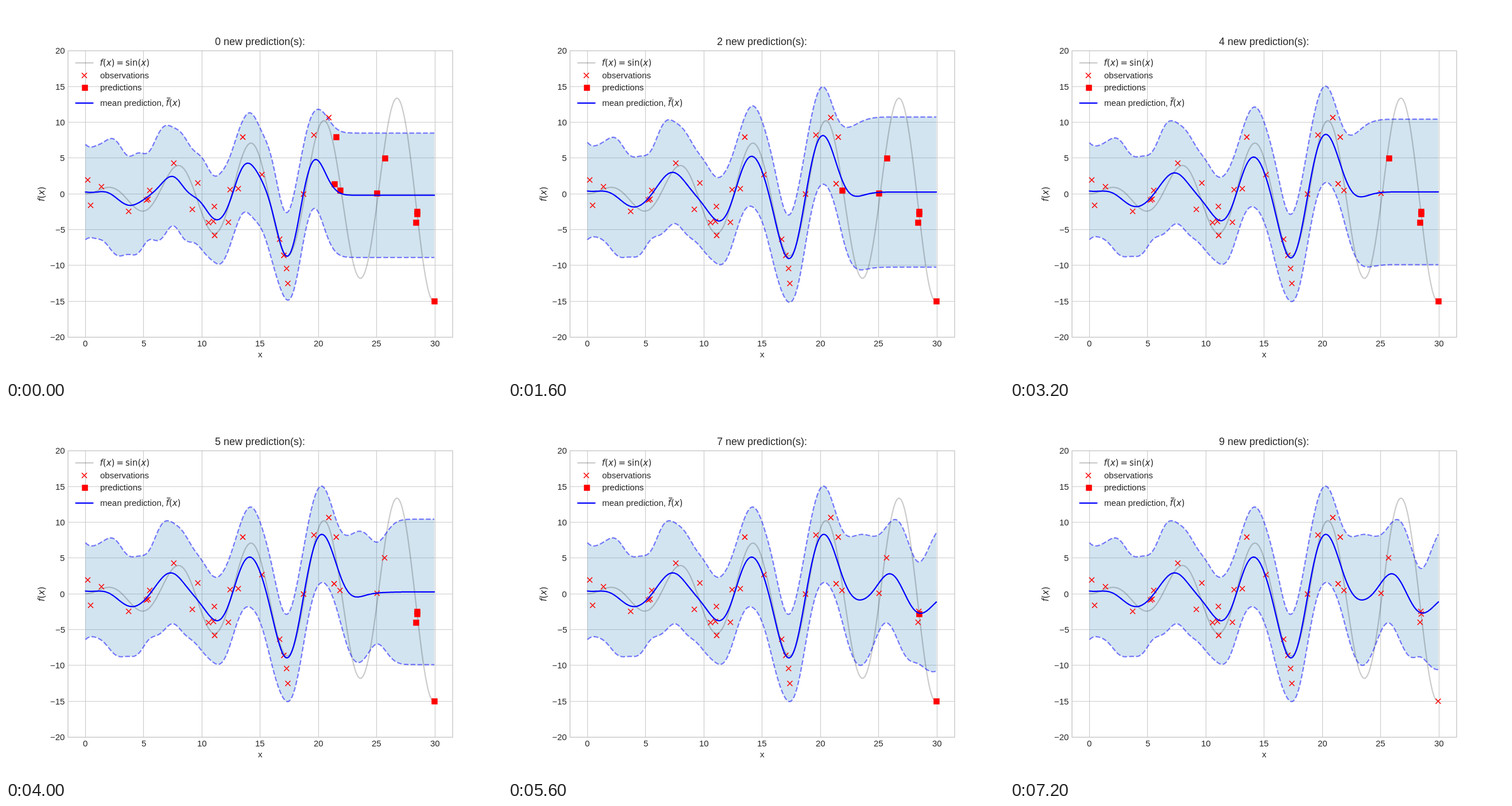
An HTML page with a canvas for the animation above (8 s loop, 864 by 648 pixels).

```html
<!DOCTYPE html>
<html lang="en">
<head>
<meta charset="utf-8">
<title>Gaussian process predictions</title>
<style>
html, body { margin: 0; width: 100%; height: 100%; overflow: hidden; background: #fff; }
canvas { display: block; }
</style>
</head>
<body>
<canvas id="plot" width="864" height="648"></canvas>
<script>
const ctx = document.getElementById('plot').getContext('2d');
const SANS = '"Liberation Sans", Arial, sans-serif';
const MATH = '"DejaVu Sans", sans-serif';
const INK = '#262626';
const GRID = '#ccc';
const SHADE = 'rgba(0,0,0,0.2)';
const STEP = 800, STATES = 10, OBSERVED = 26;

const toX = x => 108 + (x + 1.5) * 669.6 / 33;
const toY = y => 327.24 - y * 12.474;

// Samples in stage pixels, from left to right; the regression works in pixels too.
const points = [
  [142.4, 303], [147.4, 347.3], [166.3, 314.7], [213.7, 357.8], [244.8, 338], [247.5, 336.5],
  [250.4, 321.3], [292.3, 273.8], [324.6, 354.3], [334.2, 308.3], [352.8, 377.3], [361.4, 375.3],
  [363, 349.3], [363.5, 399.6], [387.4, 376.7], [390.4, 320], [404.6, 318.3], [412.5, 228.4],
  [445.8, 293.8], [476.7, 406.2], [484, 434.4], [488.8, 457.3], [491, 483.2], [518.3, 327.6],
  [536.4, 224.7], [562.3, 194.4], [571.6, 309.6], [575.3, 228.4], [581.8, 321.2], [646.4, 326.2],
  [659.5, 264.5], [714.3, 376.7], [715.6, 357.8], [716.4, 362.3], [745.9, 514.2]
];

// Length scale, band half-width far from data and mean level; the last row holds from then on.
const settings = [
  [19, 108.4, 329.7], [28.8, 127, 319.5], [24.7, 130.8, 324.1],
  [29, 132.2, 321.5], [24.5, 126.7, 323.8]
];
const NOISE = 67.8;

// Solves L v = b for a lower triangular L.
function forward(L, b) {
  const v = [];
  b.forEach((value, i) => {
    for (let j = 0; j < i; j++) value -= L[i][j] * v[j];
    v.push(value / L[i][i]);
  });
  return v;
}

// Gaussian process with an RBF kernel and white noise; the newest sample is not yet learnt.
function regress(state) {
  const [scale, spread, level] = settings[Math.min(state, settings.length - 1)];
  const train = points.slice(0, OBSERVED - 1 + state);
  const signal = spread ** 2 - NOISE ** 2;
  const kernel = (p, q) => signal * Math.exp(-(((p - q) / scale) ** 2) / 2);
  const L = [];
  train.forEach(([x], i) => {
    const row = forward(L, train.slice(0, i).map(p => kernel(x, p[0])));
    const rest = signal + NOISE ** 2 - row.reduce((s, e) => s + e * e, 0);
    L.push([...row, Math.sqrt(rest)]);
  });
  const z = forward(L, train.map(p => p[1] - level));
  return x => {
    const v = forward(L, train.map(p => kernel(x, p[0])));
    let mean = level, variance = spread ** 2;
    v.forEach((e, i) => { mean += e * z[i]; variance -= e * e; });
    return [mean, Math.sqrt(variance)];
  };
}

function curvesOf(state) {
  const predict = regress(state);
  const mean = [], upper = [], lower = [];
  for (let i = 0; i <= 300; i++) {
    const x = toX(29.95 * i / 300);
    const [y, half] = predict(x);
    mean.push([x, y]);
    upper.push([x, y - half]);
    lower.push([x, y + half]);
  }
  return { mean, upper, lower };
}

const truth = Array.from({ length: 600 }, (_, i) => {
  const x = i * 0.05;
  return [toX(x), toY(x * Math.sin(x) / 2)];
});

function line(path, color, width = 2.25, dash = []) {
  ctx.beginPath();
  path.forEach(([x, y]) => ctx.lineTo(x, y));
  ctx.strokeStyle = color;
  ctx.lineWidth = width;
  ctx.lineJoin = 'round';
  ctx.lineCap = dash.length ? 'butt' : 'round';
  ctx.setLineDash(dash);
  ctx.stroke();
  ctx.setLineDash([]);
}

function cross(x, y) {
  const r = 4.5;
  ctx.lineCap = 'butt';
  ctx.strokeStyle = '#f00';
  ctx.lineWidth = 1.5;
  ctx.beginPath();
  ctx.moveTo(x - r, y - r); ctx.lineTo(x + r, y + r);
  ctx.moveTo(x - r, y + r); ctx.lineTo(x + r, y - r);
  ctx.stroke();
}

function square(x, y) {
  ctx.fillStyle = '#f00';
  ctx.fillRect(Math.round(x) - 4.75, Math.round(y) - 4.75, 10.5, 10.5);
}

// Text on whole pixels; anchor is 0 for left, 0.5 for centre, 1 for right.
function text(str, x, y, anchor = 0, size = 15) {
  ctx.font = `${size}px ${SANS}`;
  ctx.fillStyle = INK;
  ctx.fillText(str, Math.round(x - anchor * ctx.measureText(str).width), Math.round(y));
}

// Letters in italics, everything else upright.
function math(parts, x, y) {
  ctx.fillStyle = INK;
  for (const part of parts) {
    const gap = part === '=' ? 3 : 0;
    ctx.font = `${/^[fx]$/.test(part) ? 'italic ' : ''}15px ${MATH}`;
    ctx.fillText(part, x + gap, y);
    x += ctx.measureText(part).width + 2 * gap;
  }
}

function drawGrid() {
  const snap = v => Math.floor(v) + 0.5;
  for (let x = 0; x <= 30; x += 5) {
    const px = snap(toX(x));
    line([[px, 78], [px, 577]], GRID, 1.2);
    text(String(x), toX(x), 593, 0.5);
  }
  for (let y = -20; y <= 20; y += 5) {
    const py = snap(toY(y));
    if (Math.abs(y) < 20) line([[108, py], [778, py]], GRID, 1.2);
    text(String(y).replace('-', '\u2212'), 102.7, toY(y) + 5.4, 1);
  }
}

function drawFrame() {
  ctx.strokeStyle = GRID;
  ctx.lineWidth = 1.5;
  ctx.strokeRect(108, 78, 670, 499);
  text('x', 442.8, 612, 0.5);
  ctx.save();
  ctx.translate(67, 340.5);
  ctx.rotate(-Math.PI / 2);
  math('f(x)', 0, 0);
  ctx.restore();
}

function drawLegend() {
  const left = 121.5, right = 151.5, label = 163.5;
  line([[left, 99], [right, 99]], SHADE);
  cross(136.5, 121);
  square(136.5, 142);
  line([[left, 169], [right, 169]], '#00f');
  math([...'f(x)=', 'sin', ...'(x)'], label, 104);
  text('observations', label, 126);
  text('predictions', label, 147);
  text('mean prediction, ', label, 174);
  math('f(x)', 278.6, 174);
  ctx.fillRect(280, 159.6, 6.5, 1.2);
}

function draw(state) {
  const { mean, upper, lower } = curvesOf(state);
  ctx.fillStyle = '#fff';
  ctx.fillRect(0, 0, 864, 648);
  drawGrid();

  ctx.beginPath();
  [...upper, ...lower.slice().reverse()].forEach(([x, y]) => ctx.lineTo(x, y));
  ctx.fillStyle = 'rgba(31,119,180,0.2)';
  ctx.fill();

  line(truth, SHADE);
  points.forEach(([x, y], i) => (i < OBSERVED + state ? cross : square)(x, y));
  line(mean, '#00f');
  for (const edge of [upper, lower]) line(edge, 'rgba(0,0,255,0.5)', 2.25, [8.325, 3.6]);

  drawFrame();
  drawLegend();
  text(`${state} new prediction(s):`, 442.8, 68, 0.5, 18);
}

let shown = -1;
function tick() {
  const state = Math.floor(performance.now() / STEP) % STATES;
  if (state !== shown) draw(shown = state);
  requestAnimationFrame(tick);
}
tick();
</script>
</body>
</html>
```
